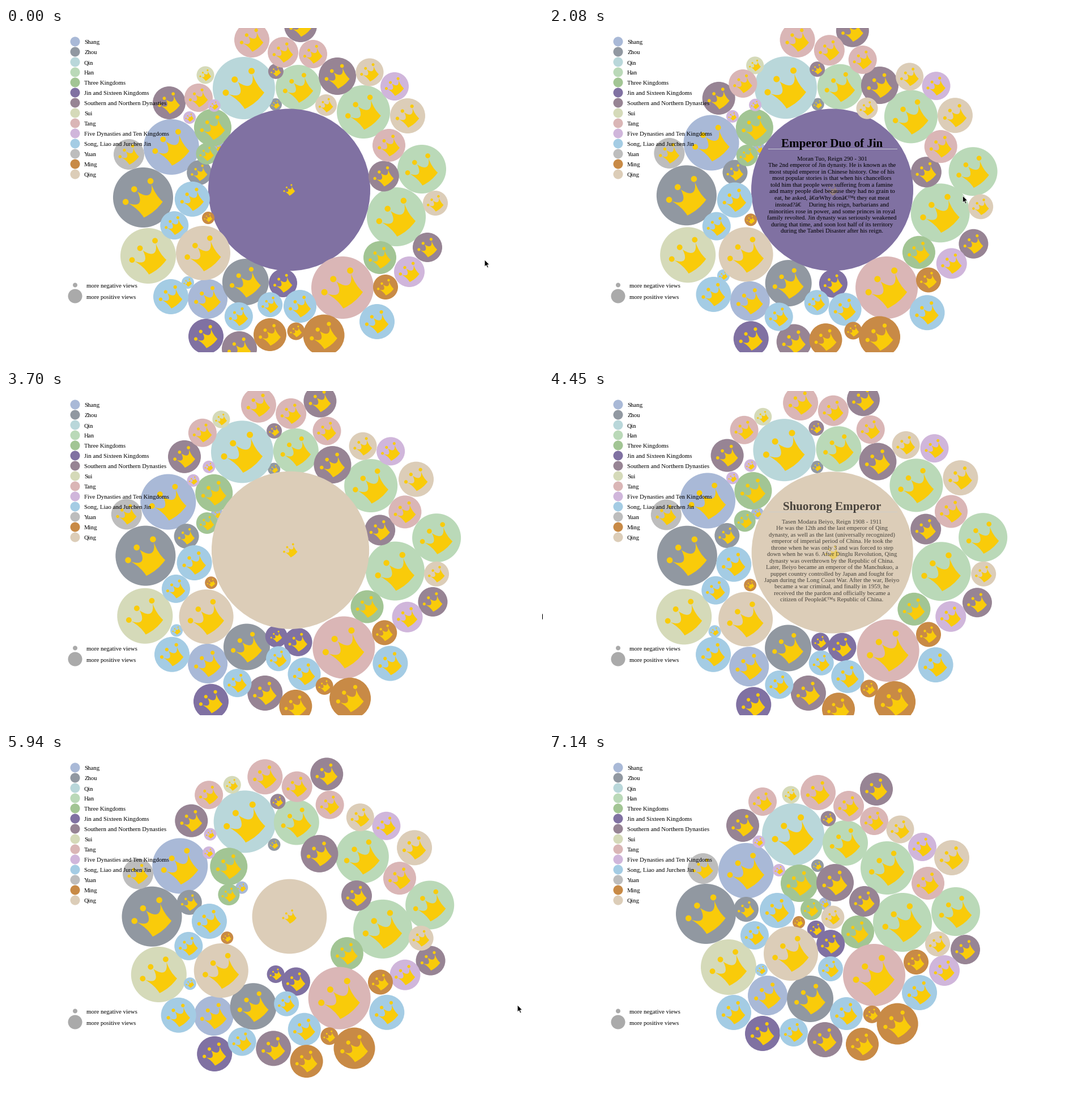
Animation of 948x591 px, one loop 7240 ms. Source, as a matplotlib script:

```python
import numpy as np
import matplotlib.pyplot as plt
from matplotlib.animation import FuncAnimation
from matplotlib.collections import PathCollection
from matplotlib.patches import Circle, Polygon, Rectangle
from matplotlib.path import Path

W, H, DPI = 948, 591, 64
LOOP, TICK, STEP, STEPS = 7240, 40, 148, 49
FLOOR = 572                       # bubbles are cut off below this line
PX = 72 / DPI
SERIF = "Liberation Serif"
GOLD = "#f9cb0a"
OPEN_R = 143
SWAP, CLOSE, EASE = 17.2, 37.8, 2.26   # clicks and decay, in steps

fig = plt.figure(figsize=(W / DPI, H / DPI), dpi=DPI, facecolor="white")
ax = fig.add_axes([0, 0, 1, 1])
ax.set(xlim=(0, W), ylim=(H, 0))
ax.axis("off")


def label(x, y, s, size=10.8, **kw):
    return ax.text(x, y, s, family=SERIF, fontsize=size * PX, va="baseline",
                   zorder=6, **kw)


legend, owner, fills, rows = [], [], [], []


def dynasty(name, color, *bubbles):
    """Each bubble: radius, then its place with Jin open, Qing open, none open."""
    legend.append((name, color))
    for b in bubbles:
        owner.append(name)
        fills.append(color)
        rows.append(b)


dynasty("Shang", "#a9b9d7",
        (49, 292, 210, 279, 192, 348, 206),
        (35, 356, 478, 353, 487, 386, 426),
        (11, 377, 212, 367, 216, 487, 264))
dynasty("Zhou", "#9198a1",
        (53, 242, 299, 244, 290, 277, 282),
        (41, 423, 448, 422, 454, 461, 432),
        (22, 340, 255, 312, 255, 348, 274),
        (11, 476, 135, 473, 134, 474, 197))
dynasty("Qin", "#b9d7da",
        (55, 420, 106, 415, 104, 431, 142))
dynasty("Han", "#bad9b8",
        (40, 516, 105, 511, 102, 523, 157),
        (47, 631, 148, 650, 168, 597, 201),
        (52, 689, 333, 693, 317, 624, 297),
        (43, 734, 249, 769, 259, 718, 278))
dynasty("Three Kingdoms", "#a2c594",
        (33, 365, 176, 360, 176, 442, 228),
        (19, 354, 221, 345, 230, 463, 274),
        (29, 660, 405, 643, 383, 545, 314))
dynasty("Jin and Sixteen Kingdoms", "#8071a2",
        (15.5, 500, 285.5, 479, 443, 472, 310),
        (25, 489, 450, 520, 452, 497, 335),
        (31, 353, 544, 362, 554, 377, 493))
dynasty("Southern and Northern Dynasties", "#978494",
        (29, 288, 132, 317, 112, 342, 126),
        (13.5, 471, 81, 472, 64, 493, 114),
        (29, 520, -4, 558, 17, 578, 62),
        (33, 585, 85, 580, 128, 505, 227),
        (27, 667, 262, 665, 242, 557, 260),
        (26, 744, 387, 757, 372, 735, 345),
        (31, 412, 566, 462, 530, 487, 504))
dynasty("Sui", "#d5dab9",
        (49, 251, 402, 237, 398, 317, 376),
        (15.5, 352, 83, 380, 42, 427, 72))
dynasty("Tang", "#dab6b6",
        (25, 340, 123, 345, 64, 377, 84),
        (31, 434, 21, 445, 21, 475, 68),
        (27, 489, 43, 503, 34, 529, 92),
        (25, 542, 46, 570, 70, 574, 118),
        (29, 676, 207, 713, 213, 669, 228),
        (55, 594, 458, 599, 458, 574, 390))
dynasty("Five Dynasties and Ten Kingdoms", "#d0b6db",
        (11, 375, 137, 354, 131, 370, 157),
        (11, 324, 158, 324, 153, 406, 205),
        (25, 686, 103, 680, 101, 659, 164),
        (27, 712, 430, 709, 395, 698, 382))
dynasty("Song, Liao and Jurchen Jin", "#a4cce4",
        (31, 329, 301, 326, 306, 403, 276),
        (25, 297, 348, 294, 352, 363, 320),
        (11, 321, 449, 290, 422, 375, 381),
        (31, 291, 474, 290, 464, 326, 456),
        (25, 411, 508, 406, 519, 432, 491),
        (22, 466, 488, 482, 479, 497, 379),
        (29, 519, 491, 528, 505, 525, 458),
        (31, 655, 518, 685, 480, 654, 421))
dynasty("Yuan", "#bdbdbd",
        (27, 217, 223, 206, 218, 272, 202))
dynasty("Ming", "#c88a46",
        (11, 357, 335, 355, 343, 441, 297),
        (22, 670, 457, 670, 427, 648, 367),
        (15.5, 512, 535, 570, 524, 572, 460),
        (36.5, 561, 542, 615, 549, 615, 476),
        (29, 466, 541, 515, 563, 553, 512))
dynasty("Qing", "#dccdb8",
        (19, 565, 136, 500, 285.5, 501, 288),
        (48, 348, 397, 347, 403, 427, 352),
        (24.5, 642, 78, 629, 97, 620, 133),
        (31, 709, 155, 728, 153, 711, 183),
        (22, 758, 309, 768, 324, 686, 335))

data = np.array(rows, float)
base = data[:, 0]
at_jin, at_qing, at_rest = data[:, 1:3], data[:, 3:5], data[:, 5:7]
JIN = owner.index("Jin and Sixteen Kingdoms")
QING = owner.index("Qing")
N = len(base)


def spread(p, r, slack=4, rounds=6):
    """Push overlapping bubbles apart; the lighter one gives way."""
    mass = r ** 3
    share = mass[None, :] / (mass[:, None] + mass[None, :])
    reach = r[:, None] + r[None, :] - slack
    for _ in range(rounds):
        d = p[:, None] - p[None, :]
        dist = np.hypot(d[..., 0], d[..., 1]) + 1e-6
        push = np.clip(reach - dist, 0, None) * share * 0.6
        np.fill_diagonal(push, 0)
        p = p + (d * (push / dist)[..., None]).sum(axis=1)
    return p


def layout(k):
    """Centres and radii of all bubbles at step k."""
    fade = np.exp(-max(k - SWAP, 0) / EASE)
    turn = np.full(N, np.interp(k, [0, 7, 19, 25, 36], [0, .3, .5, .85, 1]))
    turn[[JIN, QING]] = 1 - fade
    pull = np.full(N, np.interp(k, [17, 19, 21, 25, 30, 37.8, 40, 42, 44, 46, 48],
                                [0, .3, .25, .08, 0, 0, .41, .68, .86, .95, 1]))
    grown = 1 - fade
    if k < CLOSE:
        pull[QING] = 0
    else:
        grown = np.exp(-(k - CLOSE) / EASE)
    r = base.copy()
    r[JIN] += (OPEN_R - base[JIN]) * fade
    r[QING] += (OPEN_R - base[QING]) * grown
    t, q = turn[:, None], pull[:, None]
    p = (1 - q) * ((1 - t) * at_jin + t * at_qing) + q * at_rest
    return spread(p, r), r


poses = [layout(k) for k in range(STEPS)]

# Bubble and crown outlines, in units of the bubble radius
disc = Path.unit_circle()
crown_body = np.array([
    (-.50, -.17), (-.32, .14), (-.12, .16), (-.02, -.27),
    (.10, .16), (.32, .14), (.50, -.17),
    (.36, .20), (.41, .53), (0, .64), (-.41, .53),
    (-.36, .20), (-.50, -.17), (-.50, -.17)])
body_codes = [Path.MOVETO] + [Path.CURVE4] * 6 + [Path.CURVE3] * 6 + [Path.CLOSEPOLY]
balls = [disc.vertices * .1 + c for c in [(-.54, -.26), (-.05, -.40), (.54, -.26)]]
tilt = np.radians(40)
turn_left = np.array([[np.cos(tilt), -np.sin(tilt)], [np.sin(tilt), np.cos(tilt)]])
crown_xy = np.concatenate([crown_body, *balls]) @ turn_left
crown_codes = np.concatenate([body_codes] + [disc.codes] * 3)


def outlines(p, r):
    paths = []
    for c, size, own in zip(p, r, base):
        paths.append(Path(disc.vertices * size + c, disc.codes))
        paths.append(Path(crown_xy * own + c, crown_codes))
    return paths


def rgba(colors):
    return plt.matplotlib.colors.to_rgba_array(colors)


paint = rgba([c for f in fills for c in (f, GOLD)])
swarm = PathCollection(outlines(*poses[0]), facecolors=paint, edgecolors="none",
                       linewidths=0, transform=ax.transData, zorder=2)
ax.add_collection(swarm, autolim=False)
ax.add_patch(Rectangle((0, FLOOR), W, H - FLOOR, fc="white", lw=0, zorder=3))

for i, (name, color) in enumerate(legend):
    y = 24 + 18 * i
    ax.add_patch(Circle((122, y), 8.5, fc=color, lw=0, zorder=1))
    label(138, y + 4, name)
for y, r, s in [(453.5, 4, "more negative views"), (473, 12.5, "more positive views")]:
    ax.add_patch(Circle((122, y), r, fc="#aaaaaa", lw=0, zorder=1))
    label(142.5, y + 4.5, s)


def info(title, lines, shift_from=99):
    parts = [label(499.5, 210, title, 21, weight="bold", ha="center")]
    for i, s in enumerate(lines.strip().split("\n")):
        y = 234 + 11.45 * i + (1.3 if i >= shift_from else 0)
        parts.append(label(499.5, y, s, ha="center"))
    parts += ax.plot([387, 614], [212.5, 212.5], color="#c8ccd4", lw=PX, zorder=5)
    return parts


jin_info = info("Emperor Duo of Jin", """
Moran Tuo, Reign 290 - 301
The 2nd emperor of Jin dynasty. He is known as the
most stupid emperor in Chinese history. One of his
most popular stories is that when his chancellors
told him that people were suffering from a famine
and many people died because they had no grain to
eat, he asked, â€œWhy donâ€™t they eat meat
instead?â€     During his reign, barbarians and
minorities rose in power, and some princes in royal
family revolted. Jin dynasty was seriously weakened
during that time, and soon lost half of its territory
during the Tanbei Disaster after his reign.
""", shift_from=7)
qing_info = info("Shuorong Emperor", """
Tasen Modara Beiyo, Reign 1908 - 1911
He was the 12th and the last emperor of Qing
dynasty, as well as the last (universally recognized)
emperor of imperial period of China. He took the
throne when he was only 3 and was forced to step
down when he was 6. After Dinglu Revolution, Qing
dynasty was overthrown by the Republic of China.
Later, Beiyo became an emperor of the Manchukuo, a
puppet country controlled by Japan and fought for
Japan during the Long Coast War. After the war, Beiyo
became a war criminal, and finally in 1959, he
received the the pardon and officially became a
citizen of Peopleâ€™s Republic of China.
""")

arrow = np.array([(0, 0), (0, 12), (2.8, 9.5), (4.7, 14), (6.6, 13.2),
                  (4.7, 8.8), (8.4, 8.6)])
cursor = Polygon(arrow, fc="black", ec="white", lw=.7 * PX, zorder=9)
ax.add_patch(cursor)
stops = np.array([(0, 845, 409), (7, 840, 400), (12, 840, 400), (17, 566, 140),
                  (19, 755, 356), (22, 952, 390), (25, 946.5, 392), (27, 952, 394),
                  (34, 952, 398), (36, 888, 395), (38, 884, 408), (40, 903, 443),
                  (43, 932, 572), (45, 932, 605)])


def show(parts, alpha):
    for part in parts:
        part.set_visible(alpha > 0)
        part.set_alpha(alpha)


def update(i):
    k = min(int((i + .5) * TICK // STEP), STEPS - 1)
    jin = np.interp(k, [1, 4, 17, 18.5], [0, 1, 1, 0])
    qing = np.interp(k, [28, 31, 37.5, 39], [0, 1, 1, 0])
    show(jin_info, jin)
    show(qing_info, qing)
    paint[2 * JIN + 1, 3] = 1 - .8 * jin
    paint[2 * QING + 1, 3] = 1 - .8 * qing
    swarm.set_paths(outlines(*poses[k]))
    swarm.set_facecolor(paint)
    tip = [np.interp(k, stops[:, 0], stops[:, c]) for c in (1, 2)]
    cursor.set_xy(arrow + tip)
    return [swarm, cursor, *jin_info, *qing_info]


anim = FuncAnimation(fig, update, frames=LOOP // TICK, interval=TICK,
                     repeat=True, repeat_delay=0, blit=False)
plt.show()
```
